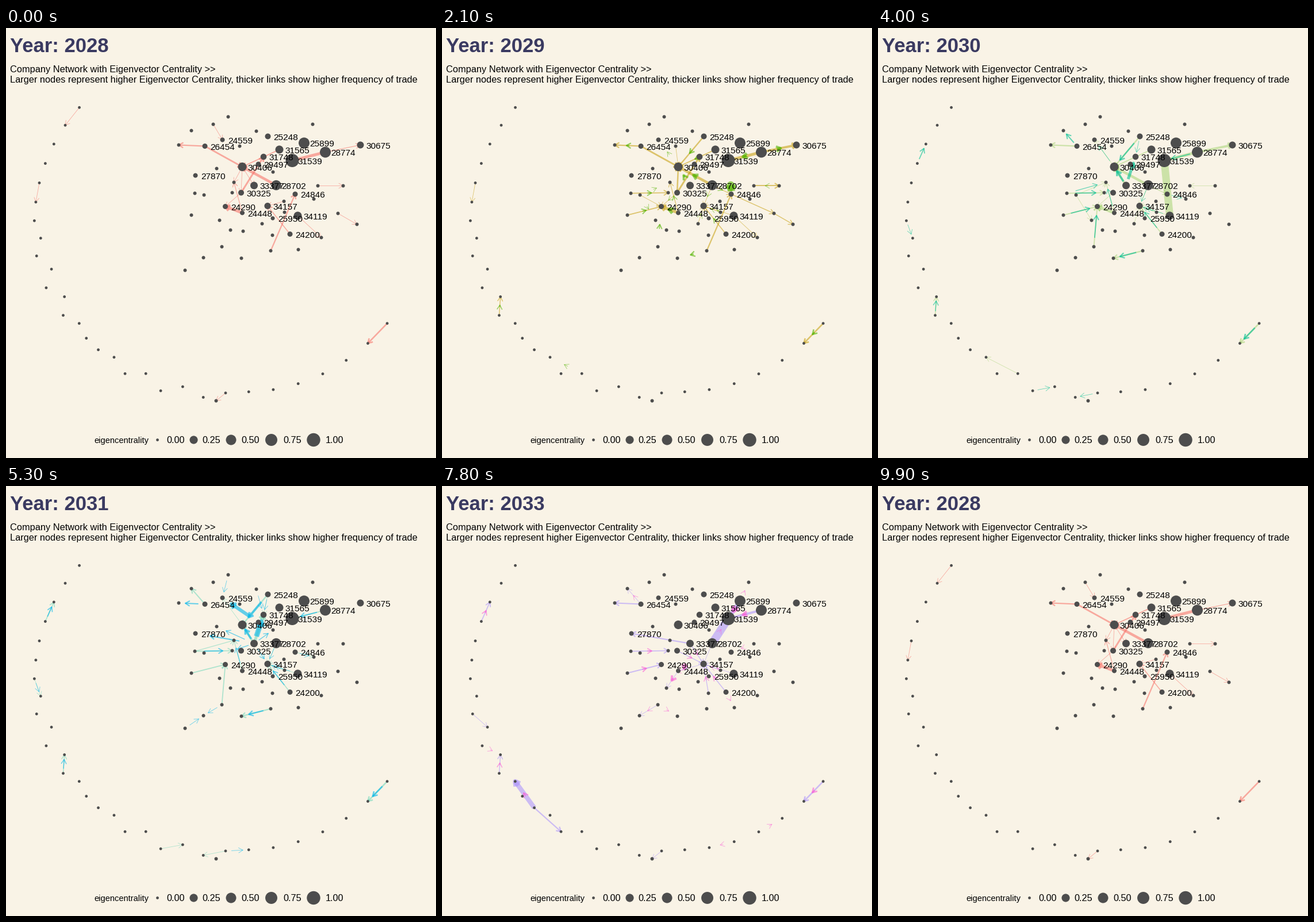
Animation of 748 by 748 pixels, one loop 10 s. Source, as a matplotlib script:

```python
from itertools import product

import numpy as np
import matplotlib.pyplot as plt
from matplotlib.animation import FuncAnimation
from matplotlib.collections import LineCollection
from matplotlib.patches import Circle

SIZE, DPI = 748, 100
PX = 72 / DPI  # points per pixel
BG, NODE, TITLE = "#f9f3e6", "#4d4d4d", "#3a3a61"
ALPHA = 0.6
HEAD, HEAD_ANGLE = 9, np.pi / 6
START = 2028
HUES = ["#F8766D", "#C49A00", "#53B400", "#00C094", "#00B6EB", "#A58AFF",
        "#FB61D7"]

plt.rcParams["font.family"] = "Liberation Sans"

# company: x, y, radius
COMPANIES = {
    24559: (376, 194, 4), 26454: (345.5, 205, 4.5), 25248: (455, 188, 5),
    25899: (518, 199.5, 9.5), 30675: (616, 203, 6), 28774: (555, 215.5, 9.5),
    31565: (475, 211, 7), 31748: (447.5, 223.5, 5.3), 31539: (497.5, 230, 11.5),
    29497: (438.5, 236.5, 4.5), 30406: (410.5, 241, 7.5), 27870: (329, 256, 4),
    33377: (431, 273.5, 6.5), 28702: (469.5, 273, 8.7), 30325: (408.5, 286, 5),
    24846: (502.5, 288.5, 4.5), 24290: (381, 310, 4.5), 24448: (410.5, 321, 4),
    34157: (454.5, 309, 5.6), 25950: (463.5, 330.5, 3.5), 34119: (507, 326, 7),
    24200: (493.5, 358, 4.5),
}
# unnamed partners, ids from 40
PARTNERS = [
    (386, 154), (322, 178), (360, 167), (435, 179), (533, 167), (300, 203),
    (406, 205), (366, 244), (464, 250), (396, 268), (393, 286), (328, 287),
    (344, 290), (322, 325), (371, 334), (390, 351), (412, 353), (445, 340),
    (463, 360), (483, 301), (484, 320), (542, 274), (586, 274), (535, 297),
    (577, 322), (610, 341), (548, 364), (508, 385), (460, 387), (409, 400),
    (375, 380), (343, 399), (311, 421), (365, 648),
]


def ring(count=30):
    """Open ring of isolated nodes: wavering in the middle, wide at the end."""
    i = np.arange(count)
    t = i / (count - 1)
    turn = np.radians(-46.3 + 193.2 * t + 6 * np.sin(2 * np.pi * t + 0.75))
    dip = np.clip(np.sin(np.pi * (i - 5) / 18), 0, None) * (i < 23)
    r = 301 - dip * (13 - 16 * np.cos(2.9 * (i - 8)))
    r += 9.4 * np.clip(i - 23, 0, None)
    return zip(350 - r * np.cos(turn), 340 + r * np.sin(turn))


nodes = dict(COMPANIES)
nodes.update({i: (x, y, 2.4) for i, (x, y) in enumerate(ring())})
nodes.update({i: (x, y, 3) for i, (x, y) in enumerate(PARTNERS, 40)})

trades = [[] for _ in HUES]


def trade(sources, targets, first, last=None, width=0.8):
    """Link every source to every target in the years first to last."""
    pairs = product(np.atleast_1d(sources), np.atleast_1d(targets))
    for a, b in pairs:
        for year in range(first, (last or first) + 1):
            trades[year - START].append((a, b, width))


# ring neighbours
trade(0, 1, 2028)
trade(4, 5, 2028, 2029)
trade(12, 11, 2029, 2034, 1.4)
trade(3, 2, 2031, 2034, 1.7)
trade(6, 7, 2031, 2032)
trade(29, 28, 2028, 2034, 2.6)
trade(18, 16, 2030)
trade(19, 20, 2031)
trade(22, 21, 2031)
trade(22, 23, 2032)
trade(22, 73, 2028)
trade([8, 22], [9, 73], 2033) if False else None
trade(22, 73, 2033)
trade(8, 9, 2033)
trade(15, 13, 2033, width=8)
trade(15, 13, 2034, width=2)
trade(15, 17, 2033, width=2.2)
trade(10, 11, 2034)
trade(26, 27, 2034)
trade(25, 24, 2034)

# around 30406 and 26454
trade(26454, 30406, 2028, 2029, 2.8)
trade(26454, 45, 2028, 2030, 2.2)
trade(26454, 45, 2032, 2033, 2)
trade(26454, 41, 2031, width=2)
trade(26454, 41, 2033, 2034)
trade(28702, 30406, 2028, 2030, 4.5)
trade(31565, 30406, 2028, 2030, 1.8)
trade(25248, 30406, 2029, 2031, 2.4)
trade(25248, 30406, 2032, width=4)
trade(33377, 30406, 2030, 2032, 3.5)
trade(30406, [30325, 33377, 49], 2028)
trade(46, 30406, 2029)
trade(30325, 30406, 2029, width=2.5)
trade(30406, 24559, 2030, 2031)

# around 31539
trade(28774, 31539, 2028, 2030, 5)
trade(28774, 31539, 2031, 2032, 1.8)
trade(28774, 31539, 2033, 2034, 4)
trade(28774, 30675, 2028, width=1.2)
trade(28774, 30675, 2029, 2030, 4)
trade(34119, 31539, 2030, width=13)
trade(28702, 31539, 2033, width=14)
trade(28702, 31539, 2034)
trade(25899, 31539, 2033, 2034, 7)
trade(25899, 44, 2034)

# around 24290 and 24448
trade(24448, 24290, 2028, 2030, 5)
trade(53, 24290, 2029, 2031, 1.8)
trade(53, 24290, 2033, 2034, 2)
trade(70, 24290, 2030, 2031, 1.8)
trade(30325, 24290, 2028, 2030)
trade(52, 24290, 2029)
trade(24448, 49, 2028, 2032, 1.2)
trade(24448, [55, 34157], 2033)
trade(24448, 55, 2034, width=4)

# around 34157
trade(24200, 34157, 2028, 2034, 1.5)
trade([60, 34119], 34157, 2029, 2034)
trade(28702, 34157, 2029, 2033)
trade(57, 34157, 2029, 2030)
trade(33377, 34157, 2032, 2034, 1.3)
trade([30325, 58], 34157, 2033, 2034, 1.3)
trade(59, 34157, 2028)
trade(34157, 54, 2034)

# around 24846
trade(68, 24846, 2028, 2029, 2.2)
trade(28702, 24846, 2029, 2030, 1.2)
trade(61, 62, 2028)
trade(61, 62, 2029, width=2)
trade(62, 61, 2030)
trade(61, 24846, 2034)
trade(64, 65, 2028)
trade(24846, 64, 2029, width=1.4)
trade(64, 65, 2029, width=1.4)
trade(24846, 63, 2031, 2032)
trade(34119, 66, 2028, 2029)

# around 33377 and 31748
trade(30325, 31748, 2028, 2029, 3)
trade(33377, 31748, 2031, width=5)
trade(33377, 31748, 2032, width=9)
trade(33377, [47, 48, 50], 2032, width=1.3)
trade(33377, 27870, 2032, 2033, 2.1)
trade(33377, 56, 2034, width=4)
trade(25248, 31748, 2031, 2032)
trade(43, 31748, 2032)

# outskirts
trade(42, 24559, 2028)
trade(40, 24559, 2032)
trade(29497, 24559, 2032, width=6)
trade(51, 50, 2029, 2034, 1.7)
trade(51, 49, 2031, width=1.2)
trade(52, [49, 54], 2030)
trade(68, 69, 2030, 2032, 2.2)
trade(70, 71, 2032, 2034)
trade(72, 71, 2032)
trade(70, 69, 2034)
trade(24200, 67, 2034)

# first frame and step count of each change to the next year
CHANGES = [(6, 9), (21, 9), (36, 9), (50, 8), (64, 8), (78, 8), (92, 8)]

fig = plt.figure(figsize=(SIZE / DPI, SIZE / DPI), dpi=DPI, facecolor=BG)
ax = fig.add_axes([0, 0, 1, 1])
ax.set(xlim=(-0.5, SIZE - 0.5), ylim=(SIZE - 0.5, -0.5))
ax.axis("off")


def text(x, y, s, px, color="black", **kw):
    return ax.text(x, y, s, fontsize=px * PX, color=color, va="baseline",
                   zorder=4, **kw)


def disc(x, y, r):
    ax.add_patch(Circle((x, y), r, fc=NODE, ec="none", zorder=3))


class Links:
    """All arrows of one year."""

    def __init__(self, rows, color):
        self.start = np.array([nodes[a][:2] for a, _, _ in rows], float)
        self.end = np.array([nodes[b][:2] for _, b, _ in rows], float)
        dx, dy = (self.end - self.start).T
        turn = np.arctan2(dy, dx)
        self.barbs = [-HEAD * np.column_stack([np.cos(t), np.sin(t)])
                      for t in (turn - HEAD_ANGLE, turn + HEAD_ANGLE)]
        style = dict(colors=color, linewidths=[w * PX for *_, w in rows],
                     capstyle="butt", joinstyle="round", zorder=2)
        self.parts = [ax.add_collection(LineCollection([], **style))
                      for _ in range(2)]

    def show(self, grow=1.0, fade=1.0):
        mid = (self.start + self.end) / 2
        a = mid + (self.start - mid) * grow
        b = mid + (self.end - mid) * grow
        left, right = self.barbs
        shaft, head = self.parts
        shaft.set_segments(np.stack([a, b], axis=1))
        head.set_segments(np.stack([b + left, b, b + right], axis=1))
        for p in self.parts:
            p.set_alpha(ALPHA * fade)
            p.set_visible(True)

    def hide(self):
        for p in self.parts:
            p.set_visible(False)


links = [Links(rows, hue) for rows, hue in zip(trades, HUES)]

for x, y, r in nodes.values():
    disc(x, y, r)
for name, (x, y, _) in COMPANIES.items():
    text(x + 9.5, y + 6.3, str(name), 15.4)

title = text(7, 41, "", 34.7, TITLE, weight="bold")
text(7, 76, "Company Network with Eigenvector Centrality >>", 16.35)
text(7, 94, "Larger nodes represent higher Eigenvector Centrality, "
     "thicker links show higher frequency of trade", 16.35)

text(152.5, 722, "eigencentrality", 14.6)
for i, (x, tx) in enumerate([(263, 278.5), (326, 340.5), (391, 409),
                             (461, 481.5), (534.5, 555.5)]):
    disc(x, 716, 2.4 + 9.3 * np.sqrt(i / 4))
    text(tx, 722, f"{i / 4:.2f}", 16.2)


def locate(f):
    """Current year index, step and step count (step 0 while holding)."""
    for i, (first, n) in enumerate(CHANGES):
        if f < first:
            return i, 0, 1
        if f < first + n - 1:
            return i, f - first + 1, n
    return 0, 0, 1


def update(f):
    i, k, n = locate(f)
    following = (i + 1) % len(links)
    for year in links:
        year.hide()
    links[i].show(fade=1 - k / n)
    if k:
        links[following].show(grow=k / n)
    nearest = following if k > (n + 1) // 2 else i
    title.set_text(f"Year: {START + nearest}")


anim = FuncAnimation(fig, update, frames=100, interval=100, repeat=True,
                     repeat_delay=0, init_func=lambda: update(0))
plt.show()
```
